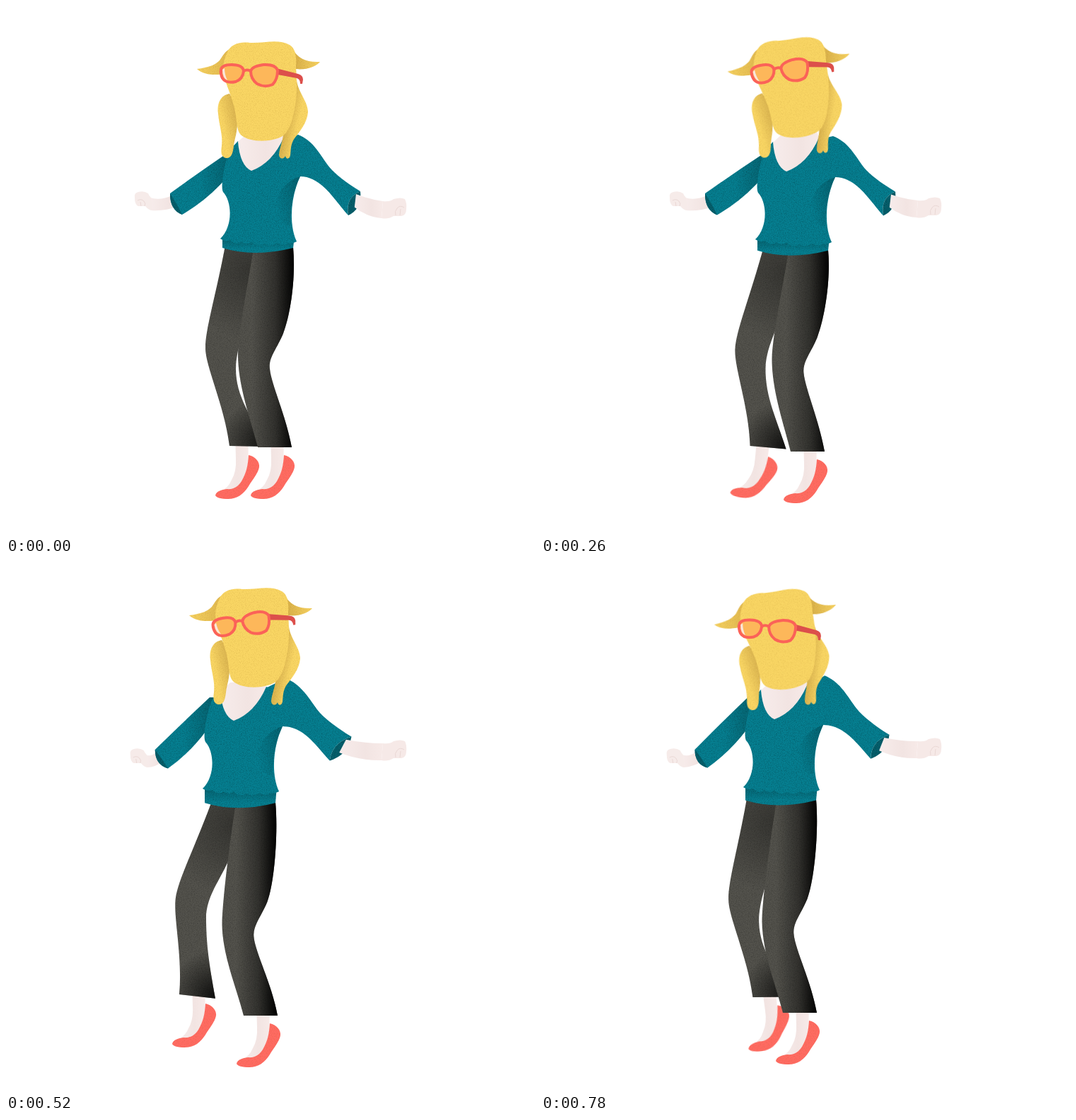
An HTML page that plays this animation: 748x748 px, repeating every 0.91 s.

```html
<!DOCTYPE html>
<html lang="en">
<head>
<meta charset="utf-8">
<title>Dancer</title>
<style>
html, body { margin: 0; width: 100%; height: 100%; overflow: hidden; background: #fff; }
svg { display: block; width: 748px; height: 748px; }
</style>
</head>
<body>
<svg viewBox="0 0 748 748">
  <defs>
    <filter id="grain" x="-5%" y="-5%" width="110%" height="110%" color-interpolation-filters="sRGB">
      <feTurbulence type="fractalNoise" baseFrequency=".75" numOctaves="2" seed="4"/>
      <feColorMatrix values="0 0 0 0 0  0 0 0 0 0  0 0 0 0 0  .5 0 0 0 -.2"/>
      <feComposite in2="SourceAlpha" operator="in" result="dots"/>
      <feMerge><feMergeNode in="SourceGraphic"/><feMergeNode in="dots"/></feMerge>
    </filter>
    <filter id="soft" x="-5%" y="-5%" width="110%" height="110%" color-interpolation-filters="sRGB">
      <feTurbulence type="fractalNoise" baseFrequency=".75" numOctaves="2" seed="9"/>
      <feColorMatrix values="0 0 0 0 .5  0 0 0 0 .3  0 0 0 0 0  .35 0 0 0 -.16"/>
      <feComposite in2="SourceAlpha" operator="in" result="dots"/>
      <feMerge><feMergeNode in="SourceGraphic"/><feMergeNode in="dots"/></feMerge>
    </filter>
    <linearGradient id="side" gradientUnits="userSpaceOnUse" y1="0" y2="0">
      <stop offset="0" stop-opacity="0"/><stop offset=".55" stop-opacity=".4"/><stop offset="1" stop-opacity="1"/>
    </linearGradient>
    <radialGradient id="crotch" gradientUnits="userSpaceOnUse" r="100">
      <stop offset="0" stop-opacity=".35"/><stop offset="1" stop-opacity="0"/>
    </radialGradient>
    <radialGradient id="hem" gradientUnits="userSpaceOnUse" r="65">
      <stop offset="0" stop-opacity=".8"/><stop offset="1" stop-opacity="0"/>
    </radialGradient>
    <linearGradient id="sleeve">
      <stop offset=".45" stop-color="#068092"/><stop offset="1" stop-color="#05606d"/>
    </linearGradient>
    <linearGradient id="under" x2="0" y2="1">
      <stop offset="0" stop-color="#05616e"/><stop offset=".75" stop-color="#068092"/>
    </linearGradient>
    <linearGradient id="pit" x1="1" x2="0" y1=".2" y2=".6">
      <stop offset="0" stop-color="#035a67" stop-opacity=".7"/><stop offset="1" stop-color="#035a67" stop-opacity="0"/>
    </linearGradient>
    <linearGradient id="wingL"><stop offset=".1" stop-color="#f3ce5e"/><stop offset=".75" stop-color="#e0b84f"/></linearGradient>
    <linearGradient id="wingR"><stop offset=".1" stop-color="#d9b14a"/><stop offset=".85" stop-color="#f3ce5e"/></linearGradient>
    <linearGradient id="drumL" x1=".9" y1=".1" x2=".3" y2=".55">
      <stop offset=".1" stop-color="#dab450"/><stop offset="1" stop-color="#f9d664"/>
    </linearGradient>
    <linearGradient id="drumR" x1=".4" y1=".3" x2=".75" y2=".5">
      <stop offset="0" stop-color="#dab450"/><stop offset=".9" stop-color="#f9d664"/>
    </linearGradient>
    <linearGradient id="skin"><stop offset="0" stop-color="#f7eceb"/><stop offset=".6" stop-color="#f2e4e2"/><stop offset="1" stop-color="#f7eae8"/></linearGradient>
    <g id="foot">
      <path fill="url(#skin)" d="M324,605L325,640Q326,658 319,670Q314,682 303,686L318,692L342,668L343,605Z"/>
      <path fill="#ff6b62" filter="url(#soft)" d="M343,635C353,637 359,645 358,652C356,662 348,670 343,679C336,690 327,697 314,697C304,697 297,695 296,692C297,686 305,684 312,683C321,684 328,680 333,672C340,660 342,650 343,635Z"/>
    </g>
  </defs>

  <use id="footL" href="#foot"/>
  <use id="footR" href="#foot"/>

  <g filter="url(#grain)">
    <path class="legL" fill="#54534d"/>
    <path class="legL" fill="url(#crotch)"/>
    <path class="legL" fill="url(#hem)"/>
  </g>
  <g filter="url(#grain)">
    <path class="legR" fill="#54534d"/>
    <path class="legR" fill="url(#side)"/>
  </g>

  <path class="armL" fill="url(#skin)"/>
  <g id="fistL">
    <path fill="#f6ebe9" d="M206,271Q203,268 202,265Q196,261 188,263Q182,264 183,271Q183,281 188,283L198,283Q203,289 208,289Z"/>
    <path fill="none" stroke="#ead8d5" d="M187,275Q192,272 196,276Q199,279 197,283M191,277L192,283"/>
  </g>

  <g filter="url(#grain)">
    <path class="shirt" fill="url(#under)"/>
    <path class="sleeveL" fill="url(#sleeve)"/>
    <path class="cuffL" fill="#05616e"/>
    <path class="sleeveR" fill="#068092"/>
    <path class="cuffR" fill="#05616e"/>
    <g class="torso">
      <path fill="#068092" d="M328,191L316,204C308,225 303,256 307,263C320,277 321,312 303,329q7,5 14,2q8,8 16,2q8,6 14,0q8,9 18,3q10,5 18,-1q10,5 16,0Q402,337 411,333C400,310 402,270 416,241L422,215L405,190L393,185L346,230Z"/>
      <path fill="url(#pit)" d="M416,241Q388,250 380,280Q384,312 402,310Q402,270 416,241Z"/>
    </g>
  </g>
  <path class="armR" fill="url(#skin)"/>
  <g id="fistR">
    <path fill="#f6e9e7" d="M531,276Q541,277 546,273Q556,270 562,273Q565,279 564,287Q564,296 557,297L546,297Q538,302 529,300Z"/>
    <path fill="none" stroke="#ead8d5" d="M561,285Q555,281 551,286Q547,290 549,296M556,287L555,296"/>
  </g>
  <path class="torso" fill="url(#skin)" d="M328,192L342,179L390,176L393,185Q377,222 347,233Q331,226 328,192Z"/>

  <g id="head">
    <g filter="url(#soft)">
      <path fill="url(#wingL)" d="M270,89C286,87 299,83 304,74C309,66 313,62 318,60L330,100L309,96C297,98 279,98 270,89Z"/>
      <path fill="url(#wingR)" d="M405,60C412,74 425,80 444,79C437,87 420,92 405,88Z"/>
      <path fill="url(#drumL)" d="M316,124C304,126 298,137 300,152C301,168 307,182 305,198C303,210 306,214 311,215C319,216 321,207 322,198C323,188 327,180 327,165C328,150 324,135 316,124Z"/>
      <path fill="url(#drumR)" d="M411,105C413,122 427,135 427,150C426,165 415,178 408,187C402,196 403,203 402,211C401,217 396,217 395,212C392,218 386,216 386,210C387,200 391,192 392,182C400,160 405,130 411,105Z"/>
      <path fill="#f9d664" d="M312,67C317,54 330,50 345,52C365,53 385,46 401,55C409,60 411,70 410,85C411,105 413,125 407,150C404,167 398,179 391,184C375,193 345,193 333,183C325,176 327,160 323,145C319,128 313,115 309,102C305,88 308,76 312,67Z"/>
    </g>
    <g id="glasses">
      <path fill="#dc4f4b" d="M382,88L413,96Q420,98 420,104L419,110L416,110Q416,103 411,102L384,97Z"/>
      <g fill="#fdb75a" stroke="#fb6258" stroke-width="4">
        <path d="M304,90Q305,83 319,83Q335,83 336,92Q335,103 325,107Q311,110 306,102Q303,96 304,90Z"/>
        <path d="M346,92Q348,85 364,83Q381,82 384,91Q384,104 377,111Q366,116 355,110Q346,103 346,92Z"/>
        <path fill="none" d="M336,92Q341,89 346,92"/>
      </g>
      <path fill="#fae6dc" d="M306,90L309,88Q309,97 313,105Q306,102 306,90Z"/>
    </g>
  </g>
</svg>

<script>
const STEP = 130, COUNT = 7;

// Key poses, one per step; every other part follows from these.
const keys = {
  torso: [[0, 0], [3, 2], [0, 1], [-9, -3], [-25, -10], [-24, -12], [-17, -12]],
  head: [[0, 0, 0], [-1, 5, -6], [-7, -4, -5], [3, -10, 5], [-11, -15, 0], [-30, -11, -6], [-26, -11, -6]],
  footL: [[0, 0, 0], [-3, -2, 0], [-26, 0, 7], [-67, -1, 12], [-61, -12, 0], [-47, -15, -4], [-5, -8, -6]],
  footR: [[0, 0], [-3, -2], [-3, 6], [-3, 10], [-20, 16], [-19, 14], [-14, 12]],
  tilt: [0, -3, -5, -2, -10, -5, 7],
  hand: [0, -4, -1, 13, -21, -23, -24]
};

const el = id => document.getElementById(id);
const at = ([x, y], dx = 0, dy = 0) => `${x + dx},${y + dy} `;
const add = ([x, y], dx, dy) => [x + dx, y + dy];
const mix = (a, b, k) => [a[0] + (b[0] - a[0]) * k, a[1] + (b[1] - a[1]) * k];
const move = (id, x, y, turn = 0, cx = 0, cy = 0) =>
  el(id).setAttribute("transform", `translate(${x} ${y}) rotate(${turn} ${cx} ${cy})`);
const shape = (name, d) => document.querySelectorAll("." + name).forEach(p => p.setAttribute("d", d));
const set = (id, attrs) => { for (const k in attrs) el(id).setAttribute(k, attrs[k]); };

function drawLegs([tx, ty], [lx, ly, turn], [rx, ry]) {
  // The hips share the shirt's shift and sink a little with the standing foot.
  const drop = ty + .45 * ry;
  const crotch = [349 + tx, 349 + drop], waistR = add(crotch, 57, -8);

  const endX = rx + 2, kneeX = (tx + endX) / 2;
  const knee = [372 + kneeX, 513 + ry], back = [327 + kneeX, 493 + ry];
  const endR = [402 + endX, 624 + ry], endL = add(endR, -48, 0);
  const calf = add(knee, 19, -50);
  shape("legR", `M${at(crotch, 0, -6)}L${at(waistR, 0, -4)}L${at(waistR)}` +
    `C${at(waistR, 4, 45)}${at(calf, 10, -26)}${at(calf)}C${at(calf, -9, 22)}${at(knee, -2, -16)}${at(knee)}` +
    `C${at(knee, 2, 22)}${at(endR, -8, -45)}${at(endR)}L${at(endL)}` +
    `C${at(endL, -10, -40)}${at(back, 0, 45)}${at(back)}C${at(back, 1, -35)}${at(crotch, -8, 50)}${at(crotch)}Z`);
  set("side", { x1: back[0] + 20, x2: waistR[0] + 2 });

  // The swinging leg: the hem follows the ankle, the knee lies between hip and hem.
  const swing = lx - tx;
  const hemX = lx + 46 * Math.sin(turn * Math.PI / 180) + .4 * tx;
  const waist = [309 + tx - .15 * swing, 344 + drop];
  const hemL = [316 + hemX, 622 + ly], hemR = add(hemL, 51, 1 - .13 * swing);
  const bend = [282 + tx + (hemX - tx) * .37, 485 + ly], inner = add(bend, 43, 28);
  const lean = (hemL[0] - waist[0]) * .09;
  shape("legL", `M${at(waist, 0, -8)}L${at(waist)}C${at(mix(waist, bend, .5))}${at(bend, -lean, -26)}${at(bend)}` +
    `C${at(bend, lean, 26)}${at(mix(hemL, bend, .4), 7)}${at(hemL)}L${at(hemR)}` +
    `C${at(mix(hemR, inner, .4), -3)}${at(inner, 0, 40)}${at(inner)}` +
    `C${at(inner, 2, -50)}${at(crotch, 5, 85)}${at(crotch, 6)}L${at(crotch, 6, -8)}Z`);
  set("crotch", { cx: crotch[0], cy: crotch[1] + 25 });
  set("hem", { cx: hemR[0], cy: hemR[1] - 4 });

  shape("shirt", `M${306 + tx},${326 + ty}L${at([306 + tx, waist[1] - 2])}Q${at(crotch, 2, 7)}${at(waistR, 0, 1)}L${408 + tx},${326 + ty}Z`);
}

function drawArms([tx, ty], hy) {
  const body = (x, y) => [x + tx, y + ty];

  // Left arm: the cuff trails the torso, the hand hardly moves.
  const hx = .25 * tx - 1;
  const lt = [232 + .85 * tx, 265 + .1 * ty], lb = [249 + .8 * tx, 295 + .45 * ty];
  const lm = mix(lt, lb, .5), low = body(309, 246), top = body(313, 208 + .8 * ty);
  const edge = `Q${at(lm, -9, 8)}${at(lb)}`;
  shape("sleeveL", `M${at(top)}Q${at(mix(top, lt, .5), 0, -1)}${at(lt)}${edge}Q${at(mix(lb, low, .5), 5, 4)}${at(low)}L${at(body(325, 235))}L${at(body(325, 200))}Z`);
  shape("cuffL", `M${at(lt)}${edge}Q${at(lm, 1, -1)}${at(lt)}Z`);
  const wrist = [205 + hx, 271], heel = [207 + hx, 289];
  const over = add(lt, 3, 3), below = mix(lt, lb, .62);
  shape("armL", `M${at(wrist)}Q${at(mix(wrist, over, .5), -2, 6)}${at(over)}L${at(lm, 8)}L${at(below)}Q${at(mix(heel, below, .5), 0, 4)}${at(heel)}Z`);
  move("fistL", hx, 0);

  // Right arm: the shoulder lifts twice as far as the torso.
  const lift = .8 * ty + .4 * hy;
  const rt = [501 + .5 * tx, 262 + lift], rb = [484 + 1.05 * tx, 296 + lift];
  const rm = mix(rt, rb, .5), sh = [413 + .7 * tx, 182 + 1.9 * ty], pit = body(416, 241);
  const elbow = add(mix(sh, rt, .5), -2, 3);
  const rim = `Q${at(rm, -13, -8)}${at(rb)}`;
  shape("sleeveR", `M${at(sh)}C${at(sh, 20, 8)}${at(elbow, -14, -20)}${at(elbow)}C${at(elbow, 8, 11)}${at(rt, -20, -12)}${at(rt)}${rim}` +
    `C${at(rb, -20, -22)}${at(pit, 30, 0)}${at(pit)}L${at(body(396, 215))}L${at(body(390, 188))}Z`);
  shape("cuffR", `M${at(rt)}${rim}Q${at(rm, 11, 8)}${at(rt)}Z`);
  const w1 = [533, 276 + hy], w2 = [531, 300 + hy];
  const a1 = add(mix(rt, rb, .12), -4, 0), a2 = add(mix(rt, rb, .66), 3, 0);
  shape("armR", `M${at(a1)}Q${at(mix(a1, w1, .5), 2, 3)}${at(w1)}L${at(w2)}Q${at(mix(a2, w2, .5), -2, 6)}${at(a2)}Z`);
  move("fistR", 2, hy);
}

function draw(i) {
  const torso = keys.torso[i], footL = keys.footL[i], footR = keys.footR[i];
  move("head", ...keys.head[i], 357, 84);
  move("glasses", 0, -.6 * torso[1], keys.tilt[i], 341, 96);
  move("footL", ...footL, 327, 670);
  move("footR", footR[0] + 50, footR[1]);
  document.querySelectorAll(".torso").forEach(g => g.setAttribute("transform", `translate(${torso})`));
  drawLegs(torso, footL, footR);
  drawArms(torso, keys.hand[i]);
}

const start = performance.now();
let shown = -1;
function tick() {
  const i = Math.floor((performance.now() - start) / STEP) % COUNT;
  if (i !== shown) draw(shown = i);
  requestAnimationFrame(tick);
}
tick();
</script>
</body>
</html>
```
